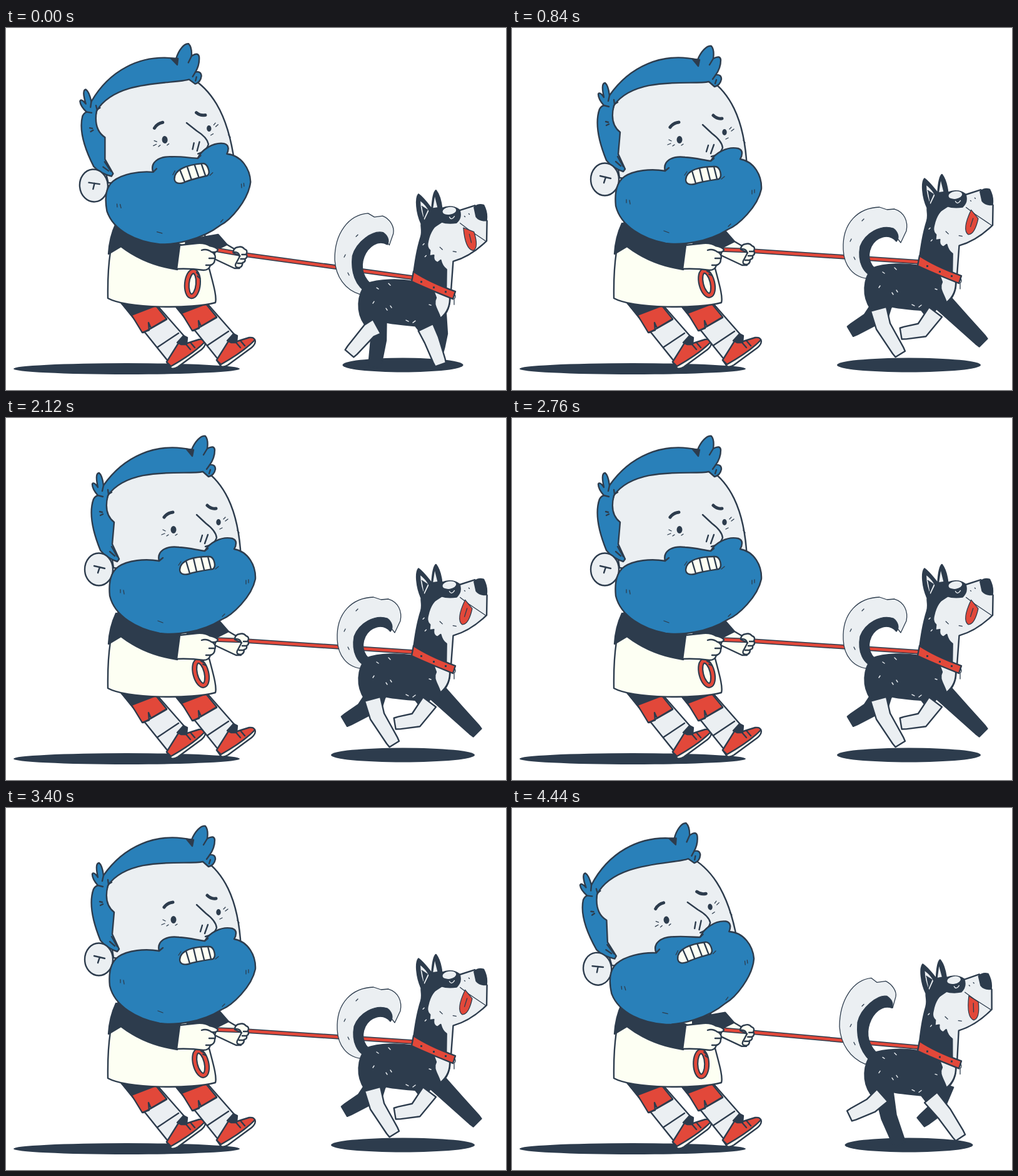
These frames come from a looping animation (800 by 580 pixels, 4.48 s). An HTML page:

```html
<!DOCTYPE html>
<html lang="en">
<head>
<meta charset="utf-8">
<title>Dog walk</title>
<style>
html, body { margin: 0; width: 100%; height: 100%; overflow: hidden; background: #fff; }
svg { display: block; width: 800px; height: 580px; }
path, ellipse { stroke: #2d3c4d; stroke-width: 2.4; stroke-linejoin: round; stroke-linecap: round; }
.navy { fill: #2d3c4d; }
.blue { fill: #2980b9; }
.red { fill: #e2483a; }
.light { fill: #ebeff2; }
.cream { fill: #fdfff3; }
.line { fill: none; }
.thick { fill: none; stroke-width: 5; }
.flat { stroke: none; }
.fleck { fill: none; stroke: #ebeff2; stroke-width: 1.4; }
.thin { stroke-width: 1.3; }
</style>
</head>
<body>
<svg viewBox="0 0 800 580">
  <ellipse class="navy flat" cx="193" cy="546" rx="181" ry="9"/>
  <ellipse class="navy flat" id="shade" cx="635" cy="540" ry="11.5"/>

  <!-- man: legs -->
  <g id="manLeg">
    <path class="light" d="M184 440L238 440L288 497L261 536Z"/>
    <path class="navy" d="M184 440L238 440L241 446L201 460Z"/>
    <path class="red" d="M201 460L240 445L257 466L232 481L228 472L229 484L218 488Z"/>
    <path class="line" d="M220 488L257 467M243 511L276 489"/>
    <path class="cream" d="M257 535L264 545Q269 547 275 543L313 515Q321 508 318 502Z"/>
    <path class="red" d="M257 535L277 503L290 505Q299 502 309 499Q317 498 318 503Q301 521 264 542Z"/>
    <path class="navy" d="M274 504L284 493L290 496L289 507L280 507Z"/>
    <path class="line" d="M289 508L295 515M296 505L302 512"/>
  </g>
  <use href="#manLeg" x="80" y="-3"/>

  <!-- man: torso and arms -->
  <path class="cream" d="M180 310C169 340 162 370 163 433C195 450 300 450 335 440C338 430 330 405 325 385L318 330Z"/>
  <g id="farArm">
    <path class="navy" d="M290 335L342 326L356 342L342 350L290 350Z"/>
    <path class="cream" d="M338 351L356 342L378 355L376 380L368 380L334 364Z"/>
  </g>
  <path id="leashEdge" class="line" style="stroke-width:7.5"/>
  <path id="leash" class="line" style="stroke:#e2483a;stroke-width:4.5"/>
  <g id="fist">
    <path class="cream" d="M366 355Q366 347 374 346Q380 344 384 349Q390 351 387 357Q390 362 385 365Q386 370 381 371Q381 379 374 379Q368 378 370 373L377 360Z"/>
    <path class="line" d="M368 354Q375 354 376 360M380 358L387 358M378 365L385 365M373 372L381 372"/>
  </g>
  <g id="loop">
    <ellipse class="line" cx="302" cy="410" rx="9" ry="20" style="stroke-width:9"/>
    <ellipse class="line" cx="302" cy="410" rx="9" ry="20" style="stroke:#e2483a;stroke-width:4.8"/>
    <path class="line" d="M307 391L311 395M309 397L313 400"/>
  </g>
  <path class="navy" d="M176 313C168 330 165 345 164 362L184 350C210 370 240 382 274 387L281 348L240 330Z"/>
  <path class="cream" d="M278 348L306 345Q318 344 326 349Q336 351 339 355Q338 360 330 359Q337 364 334 371Q334 378 327 380Q325 388 316 388Q295 385 273 386Z"/>
  <path class="line" d="M313 356Q321 353 329 359M325 369L334 369M320 380L328 380"/>

  <!-- man: head -->
  <g id="head">
    <path class="light" d="M172 240L158 150Q160 105 205 76L316 82C345 102 372 140 376 225L320 260Z"/>
    <path class="blue" d="M178 230Q160 224 151 212C138 180 133 150 140 130Q143 125 147 124Q138 114 138 106Q140 101 147 111Q142 88 149 88Q154 92 156 108C188 62 240 38 297 51C302 38 312 27 319 29Q324 35 322 49Q333 43 334 51Q334 64 326 75Q335 74 335 82Q333 92 324 94L315 86C290 92 198 75 163 124C157 148 164 160 173 167L170 202L181 226Z"/>
    <path class="navy" d="M289 50L300 51L298 61Z"/>
    <path class="line" d="M147 124L155 126M156 108L154 117M163 115L164 122L169 119M150 150L154 151M151 156L155 154M166 214L174 221M169 206L178 222M326 75L321 82M327 83L325 89M322 49L316 59"/>
    <ellipse class="light" cx="148.5" cy="242.5" rx="22.5" ry="26"/>
    <path class="line" d="M141 237L158 241M150 239L147 248"/>
    <path class="thick" d="M253 159Q258 152 267 151M322 140Q328 146 336 145"/>
    <ellipse class="navy flat" cx="268" cy="179" rx="4.5" ry="6"/>
    <ellipse class="navy flat" cx="340" cy="167" rx="3.7" ry="5"/>
    <path class="line" d="M305 155L320 169Q336 181 337 192Q334 202 319 206M314 188L311 198M323 187L318 201"/>
    <path class="line thin" d="M251 179L255 181M249 187L254 185M257 189L260 187M271 188L274 186M348 162L351 159M351 165L355 162M342 178L346 176M370 180L373 184"/>
    <path class="blue" d="M180 238C195 228 222 225 245 229C241 214 255 204 277 207C295 208 307 212 318 213C325 200 345 189 362 193C371 196 368 205 365 210C388 214 400 237 399 258C393 287 362 316 345 323C312 344 270 348 246 345C210 338 174 318 166 285C164 265 167 247 180 238Z"/>
    <path class="line" d="M245 229L251 224M318 213L323 209"/>
    <path class="cream" d="M278 243C279 227 301 222 325 222C333 222 337 238 331 242C318 244 303 246 292 250C283 252 278 249 278 243Z"/>
    <path class="line" d="M288 229L294 249M300 225L305 246M312 223L317 243M323 222L328 242"/>
    <path class="line thin" d="M276 236L280 230M335 242L340 238M183 275L183 280M188 276L189 282M384 260L384 266M388 259L388 264M243 325L251 328M346 318L350 314"/>
  </g>

  <!-- dog -->
  <path class="navy" id="hindFar"/>
  <path class="navy" id="foreFar"/>
  <g id="tail">
    <path class="light thin" id="tailFur"/>
    <path class="navy thin" id="tailCore"/>
    <path class="line thin" d="M541 342L543 338M547 367L549 371M560 309L563 306"/>
  </g>
  <g id="body">
    <path class="navy" d="M576 385C597 377 630 377 652 381L685 390L710 402C712 418 706 433 696 440L694 455L680 449L666 466L655 452C632 450 619 449 607 446L602 462L586 455L574 450C560 430 562 402 576 385Z"/>
    <path class="light" d="M684 396L710 405C711 420 705 432 695 440C691 426 682 418 688 407Z"/>
    <path class="fleck" d="M593 391L596 393M612 384L615 387M608 424L610 427M615 420L617 423M640 443L644 445M651 447L655 444M677 418L680 419M587 416L589 413"/>
  </g>
  <path class="light" id="hindNear"/>
  <path class="light" id="foreNear"/>
  <g id="dogHead">
    <path class="light" d="M668 305L726 268L752 260L771 285L770 317C752 334 735 344 716 349L712 395L670 385Z"/>
    <path class="navy" d="M651 376C655 350 658 330 665 309C668 300 665 292 666 288C658 270 657 247 662 241C670 247 677 257 683 265C684 252 686 238 690 235C696 243 698 254 699 264Q715 258 727 267Q731 279 722 287Q708 289 697 285C686 291 679 302 676 316Q673 326 679 331L678 340L685 339Q683 348 691 351L696 347Q698 357 705 362L704 396L652 378Z"/>
    <path class="light flat" d="M665 252Q674 259 678 268L671 282Q665 268 665 252ZM688 245L692 262L685 263Z"/>
    <path class="navy thin" d="M667 260L676 266L670 279"/>
    <ellipse class="light flat" cx="711" cy="268" rx="11" ry="6" transform="rotate(-8 711 268)"/>
    <path class="fleck" d="M711 278Q714 284 719 277M668 322L670 320M671 341L673 339M685 300L688 297"/>
    <path class="navy" d="M751 263Q758 257 766 260Q772 272 770 284Q759 285 754 278Z"/>
    <path class="line thin" d="M728 288L742 299L768 317M735 277L736 278M742 273L743 274M695 326L699 330M716 333L721 334"/>
    <path class="red thin" id="tongue" d="M734 294C731 315 733 330 741 333C750 331 750 316 749 304ZM741 306L741 320"/>
  </g>
  <g id="collar">
    <path class="red" d="M652 365C670 377 697 389 719 397L715 409C695 401 670 391 649 381Z"/>
    <path class="navy flat" d="M663 380h3v3h-3zM683 389h3v3h-3zM702 396h3v3h-3z"/>
    <path class="line thin" d="M717 401Q721 405 717 409L717 418"/>
  </g>
</svg>
<script>
const STEP = 40, BOB = 320, STRIDE = 640;
const el = id => document.getElementById(id);
const move = (id, value) => el(id).setAttribute('transform', value);
const shape = (id, d) => el(id).setAttribute('d', d);
const lerp = (a, b, p) => a + (b - a) * p;

// Cosine of the bounce cycle, peaking at the given moment
const wave = (t, peak) => Math.cos((t - peak) / BOB * 2 * Math.PI);

function mixPath(a, b, p) {
  const ends = b.match(/\d+/g);
  let i = 0;
  return a.replace(/\d+/g, n => lerp(+n, +ends[i++], p).toFixed(1));
}

const fur = [
  'M572 402C545 400 531 380 530 355C528 311 555 288 588 287L600 291L612 290C628 295 634 310 631 325L622 344L615 335C600 325 582 332 574 348C567 365 570 385 590 396Z',
  'M565 402C541 392 526 370 524 342C524 300 545 267 575 264L584 271L598 269C608 274 616 285 614 294L609 312L603 304C590 303 575 318 569 335C564 355 565 375 588 392Z'
];
const core = [
  'M584 400C560 396 553 372 557 350C565 328 590 315 610 321C617 326 621 336 615 342C602 327 582 336 575 350C567 367 573 385 592 392Z',
  'M580 402C556 385 551 360 553 335C558 312 585 290 600 293C606 297 611 303 608 312C592 306 578 320 572 337C567 352 568 372 590 390Z'
];

// Stride poses: time, knee x, knee y, foot x, foot y
const fore = [
  [0, 681, 500, 692, 530], [100, 672, 505, 655, 530], [200, 656, 484, 632, 488],
  [280, 678, 484, 662, 497], [320, 694, 490, 692, 507], [380, 705, 504, 714, 512],
  [520, 722, 472, 747, 497], [600, 692, 490, 712, 520]
];
const hind = [
  [0, 581, 485, 556, 514], [100, 596, 497, 598, 514], [200, 594, 478, 616, 514],
  [280, 603, 495, 617, 531], [320, 596, 500, 591, 534], [420, 582, 495, 562, 525],
  [520, 572, 468, 550, 481], [600, 574, 477, 549, 489]
];

function pose(keys, t) {
  const u = t % STRIDE;
  const i = keys.findLastIndex(k => k[0] <= u);
  const a = keys[i], b = keys[(i + 1) % keys.length];
  const p = (u - a[0]) / ((b[0] || STRIDE) - a[0]);
  return a.slice(1).map((v, n) => lerp(v, b[n + 1], p));
}

// Tapered limb from the hip through the knee to a blunt paw
function drawLeg(id, keys, t, x, y, hip) {
  const [kx, ky, fx, fy] = pose(keys, t);
  const thigh = Math.atan2(ky - y, kx - x), shin = Math.atan2(fy - ky, fx - kx);
  const at = (px, py, angle, along, side) => [
    px + along * Math.cos(angle) - side * Math.sin(angle),
    py + along * Math.sin(angle) + side * Math.cos(angle)
  ];
  const edge = s => [
    at(x, y, thigh, -6, s * hip),
    at(kx, ky, (thigh + shin) / 2, 0, s * 12),
    at(fx, fy, shin, 3, s * 10),
    at(fx, fy, shin, 10, s * 9)
  ];
  shape(id, 'M' + [...edge(1), ...edge(-1).reverse()].join('L') + 'Z');
}

function draw(t) {
  const drop = 19.2 - 22 * wave(t, 226);
  const tilt = 0.3 - 7.6 * wave(t, 278);
  const sway = wave(t, 185);
  const curl = tilt > 0 ? -tilt / 15 : -tilt / 7.3;

  move('head', `rotate(${tilt} 262 343)`);
  move('loop', `rotate(${-4 - 10.4 * sway} 302 370)`);
  const pull = `translate(${-drop * 0.1} ${drop * 0.2})`;
  move('farArm', pull);
  move('fist', pull);

  const line = `M335 355L376 ${356.5 + drop * 0.23}L652 ${375 + drop}`;
  shape('leash', line);
  shape('leashEdge', line);

  el('shade').setAttribute('rx', 105.4 + 10 * sway);
  for (const id of ['tail', 'body', 'collar']) move(id, `translate(0 ${drop})`);
  shape('tailFur', mixPath(...fur, curl));
  shape('tailCore', mixPath(...core, curl));
  move('dogHead', `translate(0 ${drop}) rotate(${-2.1 * wave(t, 260)} 690 385)`);
  move('tongue', `rotate(${-18 * Math.sin((t - 282) / BOB * 2 * Math.PI)} 741 299)`);

  drawLeg('hindNear', hind, t, 588, 456 + drop, 13);
  drawLeg('foreNear', fore, t, 674, 460 + drop, 13);
  drawLeg('hindFar', hind, t + STRIDE / 2, 594, 440 + drop, 15);
  drawLeg('foreFar', fore, t + STRIDE / 2, 690, 440 + drop, 15);
}

const start = performance.now();
function tick() {
  const t = Math.max(0, performance.now() - start);
  draw(Math.floor(t / STEP) * STEP % STRIDE);
  requestAnimationFrame(tick);
}
tick();
</script>
</body>
</html>
```
